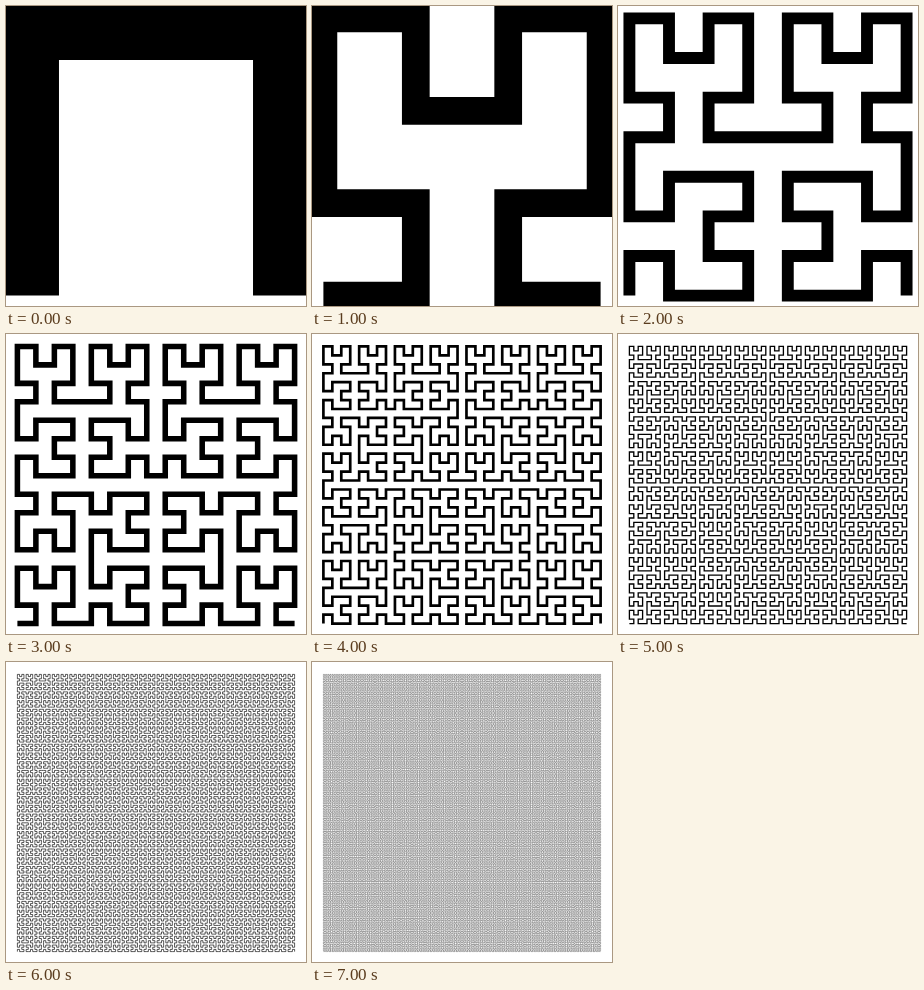
Animation of 300 by 300 pixels, one loop 9 s. Source, as an HTML page with a canvas:

```html
<!DOCTYPE html>
<html lang="en">
<head>
<meta charset="utf-8">
<title>Hilbert curve, orders 1 to 8</title>
<style>
  html, body { margin: 0; width: 100%; height: 100%; overflow: hidden; background: #fff; }
  canvas { display: block; }
</style>
</head>
<body>
<canvas width="300" height="300"></canvas>
<script>
const ctx = document.querySelector('canvas').getContext('2d');
const LOOP = 9000, STEP = 1000, MAX_ORDER = 8;
const SPAN = 277.2, WEIGHT = 0.3;
const LEFT = 150 - SPAN / 2, BOTTOM = 151 + SPAN / 2;

// Visits the curve's cells in order; (ux, uy) and (vx, vy) are the two sides of the square.
function hilbert(order, x, y, ux, uy, vx, vy, visit) {
  if (order === 0) {
    visit(x + (ux + vx) / 2, y + (uy + vy) / 2);
    return;
  }
  ux /= 2; uy /= 2; vx /= 2; vy /= 2;
  const n = order - 1;
  hilbert(n, x, y, vx, vy, ux, uy, visit);
  hilbert(n, x + ux, y + uy, ux, uy, vx, vy, visit);
  hilbert(n, x + ux + vx, y + uy + vy, ux, uy, vx, vy, visit);
  hilbert(n, x + ux + 2 * vx, y + uy + 2 * vy, -vx, -vy, -ux, -uy, visit);
}

function draw(order) {
  const cells = 2 ** order, gap = SPAN / (cells - 1);
  ctx.fillStyle = '#fff';
  ctx.fillRect(0, 0, 300, 300);
  ctx.lineWidth = gap * WEIGHT;
  ctx.beginPath();
  hilbert(order, -0.5, -0.5, 0, cells, cells, 0,
    (col, row) => ctx.lineTo(LEFT + col * gap, BOTTOM - row * gap));
  ctx.stroke();
}

let shown = 0;
function frame() {
  const time = performance.now() % LOOP;
  const order = Math.min(MAX_ORDER, 1 + Math.floor(time / STEP));
  if (order !== shown) draw(shown = order);
  requestAnimationFrame(frame);
}
frame();
</script>
</body>
</html>
```
